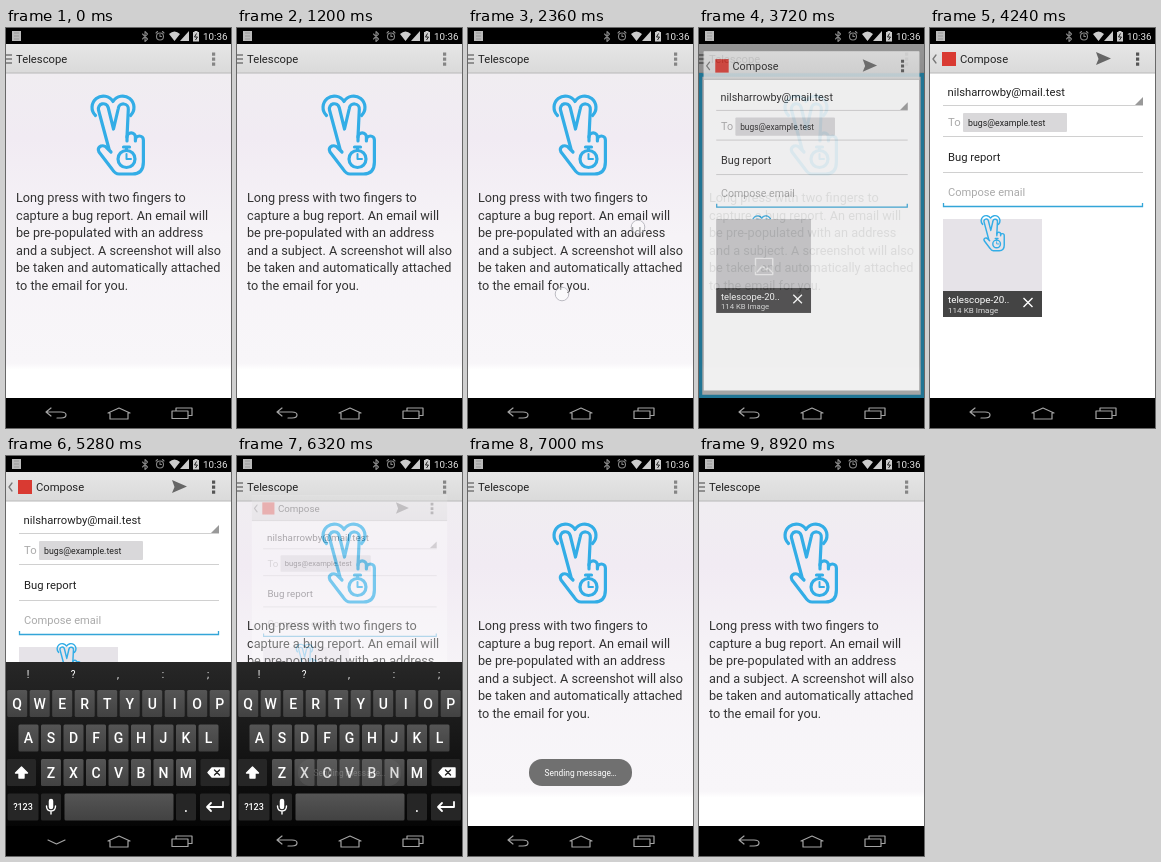
Recreate the animation shown at these times as an HTML page. Size 225x400 px, loop 9 s.

```html
<!DOCTYPE html>
<html lang="en">
<head>
<meta charset="utf-8">
<style>
html, body { margin: 0; width: 100%; height: 100%; overflow: hidden; background: #000; }
svg { display: block; width: 100vw; height: 100vh; font-family: Roboto, "Noto Sans", sans-serif; font-size: 11.25px; }
.line { fill: none; stroke-linecap: round; stroke-linejoin: round; }
</style>
</head>
<body>
<svg viewBox="0 0 225 400" xmlns="http://www.w3.org/2000/svg">
  <defs>
    <linearGradient id="page" x2="0" y2="1">
      <stop offset="0" stop-color="#f0edf1"/>
      <stop offset=".2" stop-color="#f1ebf3"/>
      <stop offset=".5" stop-color="#f6f3f7"/>
      <stop offset=".89" stop-color="#f8f6f9"/>
      <stop offset=".91" stop-color="#fff"/>
    </linearGradient>
    <linearGradient id="bar" x2="0" y2="1">
      <stop offset="0" stop-color="#e6e6e6"/>
      <stop offset="1" stop-color="#dadada"/>
    </linearGradient>
    <linearGradient id="board" x2="0" y2="1">
      <stop offset="0" stop-color="#272727"/>
      <stop offset="1" stop-color="#050505"/>
    </linearGradient>
    <linearGradient id="key" x2="0" y2="1">
      <stop offset="0" stop-color="#555"/>
      <stop offset="1" stop-color="#424242"/>
    </linearGradient>
    <g id="hand" class="line" stroke="#33ade6" stroke-width="3.200">
      <path d="M89.500 87.500A11.300 11.300 0 1 1 107 73.500A11.300 11.300 0 1 1 124.500 87.500"/>
      <path d="M103 121L92.500 82a5 5 0 0 1 9.700-2.500L107.500 101L112.300 80.500a5 5 0 0 1 10 1L121 109"/>
      <path d="M121 113v-4a4.200 4.200 0 0 1 8.400 0v4M129.400 112a4 4 0 0 1 8 0V134q0 12-11 12H113q-4 0-7-5L93 124q-2-4 2-6q4-1 6 2l4 4"/>
      <circle cx="120.500" cy="131" r="8.500"/>
      <path d="M117.500 119h6M120.500 120v2"/>
      <path d="M120.500 126v5h4.500" stroke-width="2"/>
    </g>
    <g id="dots"><path d="M206 24.500h3.200v3.200h-3.200zm0 5h3.200v3.200h-3.200zm0 5h3.200v3.200h-3.200z"/></g>
  </defs>

  <g id="home">
    <rect y="45" width="225" height="326" fill="url(#page)"/>
    <rect y="16" width="225" height="29" fill="url(#bar)"/>
    <path d="M0 45h225" stroke="#b8b8b8"/>
    <path d="M0 27h6M0 31h6M0 35h6" stroke="#777" stroke-width="1.500"/>
    <text x="10" y="35" fill="#222">Telescope</text>
    <use href="#dots" fill="#858585"/>
    <use href="#hand"/>
    <g id="copy" fill="#333" font-size="12.700"></g>
    <path id="edges" fill="none" stroke="#33b5e5" stroke-width="3.500"/>
  </g>
  <rect id="dim" y="16" width="225" height="354"/>

  <g id="compose">
    <rect y="16" width="225" height="354" fill="#fff"/>
    <rect y="16" width="225" height="29" fill="url(#bar)"/>
    <path d="M0 45h225" stroke="#b8b8b8"/>
    <path class="line" d="M6 27l-3 4 3 4" stroke="#777" stroke-width="1.300"/>
    <rect x="12" y="24" width="14" height="14" fill="#d93a32"/>
    <text x="30" y="35" fill="#222">Compose</text>
    <path d="M166 24l15 6.500-15 6.500 2.500-6z" fill="#666"/>
    <use href="#dots" fill="#555"/>
    <text x="17.500" y="68" fill="#222">nilsharrowby@mail.test</text>
    <path d="M213 69v8h-8z" fill="#999"/>
    <path d="M13 77.500h200M13 108.500h200M13 144.500h200" stroke="#d0d0d0"/>
    <text x="18" y="98" fill="#aaa">To</text>
    <rect x="33" y="85" width="104" height="19" rx="1" fill="#d9d8da"/>
    <text x="38" y="97.500" fill="#222" font-size="8.750">bugs@example.test</text>
    <text x="18" y="133" fill="#222">Bug report</text>
    <text x="18" y="168" fill="#aaa" font-size="11.100">Compose email</text>
    <path d="M13.500 175v3.500h199v-3.500" fill="none" stroke="#33a5d8" stroke-width="1.300"/>
    <g id="thumb">
      <rect x="13" y="191" width="99" height="98" fill="#e6e3e8"/>
      <use href="#hand" transform="translate(12.400 157) scale(.45)"/>
    </g>
    <g id="blank">
      <rect x="13" y="191" width="99" height="98" fill="#c9c9cb"/>
      <path class="line" d="M54 232h18v17h-18zM56 246l5-6 4 4 2-2 4 4" stroke="#eee" stroke-width="1.500"/>
    </g>
    <rect x="13" y="263" width="99" height="26" fill="#444"/>
    <text x="18" y="275" fill="#fff" font-size="9.800">telescope-20..</text>
    <text x="18" y="285" fill="#ddd" font-size="8.100">114 KB Image</text>
    <path d="M93.500 270l9 9m0-9l-9 9" stroke="#fff" stroke-width="1.400"/>
  </g>

  <g id="keyboard" fill="#fff" text-anchor="middle">
    <rect y="206" width="225" height="165" fill="url(#board)"/>
  </g>

  <g id="toast">
    <rect x="61" y="303" width="103" height="27" rx="13" fill="#707070"/>
    <text x="112.500" y="319.500" fill="#fff" font-size="8.400" text-anchor="middle">Sending message…</text>
  </g>
  <g id="press"></g>
  <g id="tap"></g>

  <g id="system">
    <path d="M0 0h225v16H0zM0 370h225v30H0z"/>
    <rect x="6" y="3" width="9" height="10" fill="#bbb"/>
    <path d="M8 5h5M8 8h5M8 11h5" stroke="#999"/>
    <g class="line" stroke="#858585" stroke-width="1.100">
      <path d="M136.500 6l5 5-2.500 2.500v-10l2.500 2.500-5 5"/>
      <circle cx="154" cy="8.500" r="3.500"/>
      <path d="M154 6.500v2h1.500M150 5l1.500-1.500M158 5l-1.500-1.500"/>
    </g>
    <path d="M163 6q5.500-5 11 0l-5.500 7zM183 3v10h-9z" fill="#ccc"/>
    <path d="M187 4h1.500V3h3v1h1.500v9.500h-6z" fill="#ccc"/>
    <path d="M190.500 5.500l-2 3.500h3l-2 3" fill="none" stroke="#222"/>
    <text x="197" y="12" fill="#e4e4e4" font-size="9.800">10:36</text>
    <g class="line" stroke="#a4a4a4" stroke-width="1.200">
      <path id="back" d="M45 380l-5 4 5 4M41 384h14q5 0 5 3t-5 3h-4"/>
      <path id="down" d="M42 384l8.500 4 8.500-4"/>
      <path d="M102 385l11-5 11 5h-2v6h-18v-6z"/>
      <path d="M170 383v-3h16v7.500h-3M166 383h16v7.500h-16z"/>
    </g>
  </g>
</svg>
<script>
const $ = id => document.getElementById(id);
const add = (parent, tag, attrs, text) => {
  const el = document.createElementNS("http://www.w3.org/2000/svg", tag);
  for (const name in attrs) el.setAttribute(name, attrs[name]);
  if (text) el.textContent = text;
  return parent.appendChild(el);
};

["Long press with two fingers to", "capture a bug report. An email will",
 "be pre-populated with an address", "and a subject. A screenshot will also",
 "be taken and automatically attached", "to the email for you."]
  .forEach((line, i) => add($("copy"), "text", { x: 10, y: 174 + 17.5 * i }, line));

// Keyboard
const board = $("keyboard");
const key = (x, y, width, fill, label = "", size = 14) => {
  add(board, "rect", { x: x - width / 2, y: y - 13.5, width, height: 27, rx: 1.5, fill });
  add(board, "text", { x, y: y + size * .36, "font-size": size, "font-weight": 500 }, label);
};
const icon = (d, width = 1.4, stroke = "#fff", fill = "none") =>
  add(board, "path", { d, stroke, fill, "stroke-width": width, "stroke-linecap": "round", "stroke-linejoin": "round" });
const light = "url(#key)", dark = "#262626";
[..."!?,:;"].forEach((c, i) => add(board, "text", { x: 22 + 45 * i, y: 222, "font-size": 10 }, c));
["QWERTYUIOP", "ASDFGHJKL", "ZXCVBNM"].forEach((row, r) =>
  [...row].forEach((c, i) => key([11.2, 22.5, 45][r] + 22.5 * i, 247.5 + 34.5 * r, 20, light, c)));
key(15.5, 316.5, 29, dark);
key(209, 316.5, 29, dark);
key(17, 351, 31, dark, "?123", 9);
key(45, 351, 20, dark);
key(113, 351, 109, light);
key(180, 351, 20, dark, ".");
key(209, 351, 30, dark);
icon("M15.500 311l-6 6h3.500v5h5v-5h3.500z", 1.4, "#fff", "#fff");
icon("M206 312h12v9h-12l-4-4.500z", 1.4, "#fff", "#fff");
icon("M208.500 314l5 5m0-5l-5 5", 1.4, dark);
icon("M45 345v6", 4.5);
icon("M40.500 350q0 5 4.500 5t4.500-5M45 355v3");
icon("M217 346v5h-16m4-4l-4 4 4 4", 1.8);

const dot = (parent, cx, cy) =>
  add(parent, "circle", { cx, cy, r: 6.8, fill: "#ffffff99", stroke: "#a8a8b0", "stroke-width": 1 });
dot($("press"), 170, 199);
dot($("press"), 94, 266);
dot($("tap"), 172, 31);

const ramp = (t, start, length) => Math.min(1, Math.max(0, (t - start) / length));
const decel = p => 1 - (1 - p) ** 3;
const pulse = (t, on, off, rise = 80, fall = 120) => ramp(t, on, rise) * (1 - ramp(t, off, fall));
const fade = (id, alpha) => {
  $(id).style.display = alpha > 0 ? "" : "none";
  $(id).style.opacity = alpha;
};

function edgePath(p) {
  const w = 225 * p, h = 326 * p;
  return `M0 47h${w}M223.500 45v${h}M225 368.500h${-w}M1.500 371v${-h}`;
}

function draw(t) {
  // Long press fills a line along each edge of the page.
  const grow = ramp(t, 2400, 1000);
  $("edges").setAttribute("d", edgePath(grow));
  fade("edges", grow > 0 && t < 3960 ? 1 : 0);
  fade("press", pulse(t, 2300, 3450));

  const open = decel(ramp(t, 3600, 300));
  const close = decel(ramp(t, 6230, 300));
  const scale = .8 + .2 * open - .2 * close;
  fade("compose", Math.min(1, 1.06 * open) * (1 - close));
  $("compose").setAttribute("transform", `translate(112.5 193) scale(${scale}) translate(-112.5 -193)`);
  fade("dim", t < 5000 ? .45 * open : 0);
  fade("blank", 1 - ramp(t, 3900, 200));

  const shown = decel(ramp(t, 4550, 250)) * (1 - ramp(t, 6340, 140));
  fade("keyboard", shown);
  board.setAttribute("transform", `translate(0 ${36 * (1 - shown)})`);
  const typing = t >= 4550 && t < 6300;
  fade("down", typing ? 1 : 0);
  fade("back", typing ? 0 : 1);

  fade("tap", pulse(t, 5440, 5720));
  fade("toast", pulse(t, 6240, 8360, 320, 460));
}

const began = performance.now();
function tick() {
  draw((performance.now() - began) % 9000);
  requestAnimationFrame(tick);
}
tick();
</script>
</body>
</html>
```
